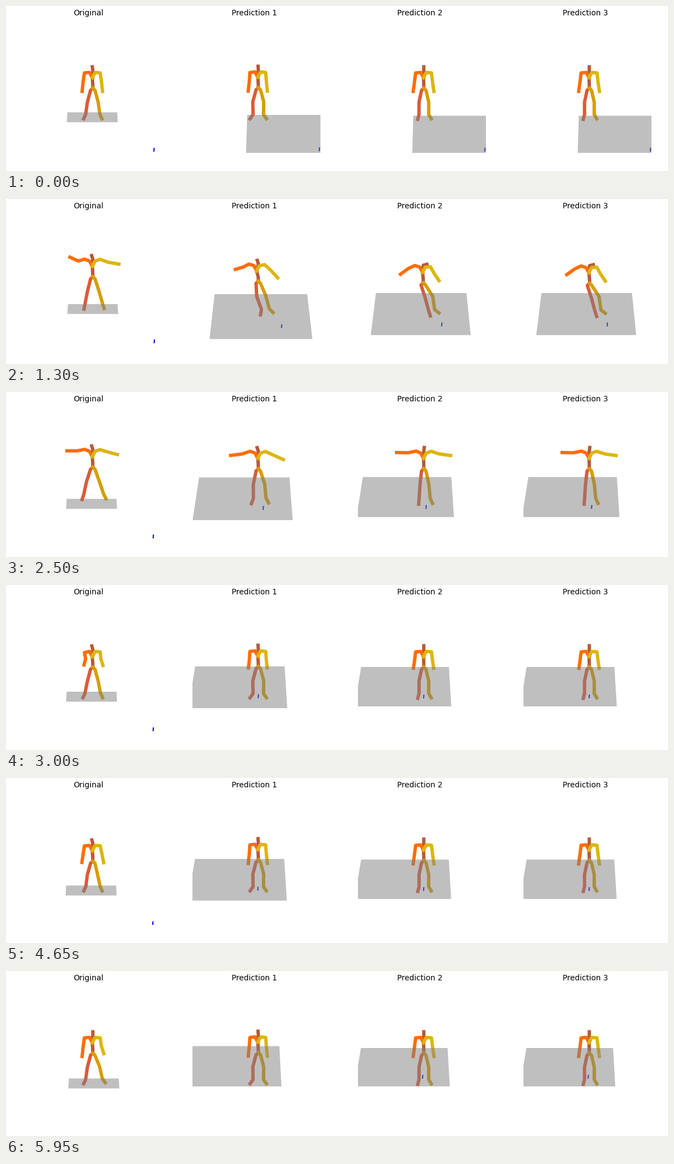
A matplotlib script that plays this animation: 1200 by 300 pixels, repeating every 6 s.

```python
import numpy as np
import matplotlib.pyplot as plt
from matplotlib.animation import FuncAnimation
from matplotlib.patches import Polygon, Rectangle

W, H, DPI = 1200, 300, 100
FRAMES, STEP = 120, 50
PANEL = W / 4
COLORS = {"spine": "#B75A39", "rleg": "#DD5A37", "lleg": "#D69E00",
          "rarm": "#FF6D00", "larm": "#DDB50E"}

# ---- figures: angles in degrees, 0 hangs straight down, positive is outward


def stance(x=157, y=149, lean=-4, nod=-8, arm=(8, 6, 1), left_arm=None,
           leg=(15, 8, 24), left_leg=None, size=1):
    """arm: upper, lower, reach; leg: thigh, shin, foot. Left copies right."""
    values = dict(x=x, y=y, lean=lean, nod=nod, size=size, arm=arm, leg=leg,
                  left_arm=left_arm or arm, left_leg=left_leg or leg)
    return {key: np.array(value, float) for key, value in values.items()}


def change(base, **new):
    return {**base, **{key: np.array(value, float) for key, value in new.items()}}


def mix(a, b, w):
    return {key: a[key] + (b[key] - a[key]) * w for key in a}


def chain(start, angles, lengths, side=1):
    a = np.radians(angles)
    bones = np.array(lengths) * (side * np.sin(a) + 1j * np.cos(a))
    return start + np.concatenate([[0], np.cumsum(bones)])


def arm_chain(chest, arm, side):
    upper, lower, reach = arm
    lift = upper / 90
    return chain(chest, [152, 82 + 36 * lift, upper, lower],
                 [10.8, 9.3, reach * (17 - 3 * lift), reach * (17 + 3 * lift)], side)


def leg_chain(pelvis, leg, size, side):
    return chain(pelvis, [45, *leg], [5.7, 22 * size, 22.5 * size, 9 * size], side)


def body(p):
    pelvis = p["x"] + 1j * p["y"]
    spine = chain(pelvis, [180, 180 - p["lean"], 180 + p["lean"], 180 - p["nod"]],
                  [7, 12, 13, 6.8])
    return {"spine": spine,
            "rleg": leg_chain(pelvis, p["leg"], p["size"], -1),
            "lleg": leg_chain(pelvis, p["left_leg"], p["size"], 1),
            "rarm": arm_chain(spine[2], p["arm"], -1),
            "larm": arm_chain(spine[2], p["left_arm"], 1)}


def jumper(still, star, land, dip=None, bend=None, end=None):
    """Poses of one figure; unnamed ones are derived from standing still."""
    return dict(still=still, star=star, land=land, end=end or still,
                peak=mix(still, star, 1.06),
                dip=dip or change(still, y=still["y"] + 2, size=still["size"] - 0.03),
                bend=bend or change(still, arm=still["arm"] * [1, 1, 0.88],
                                    left_arm=still["left_arm"] * [1, 1, 0.88]))


first = jumper(
    still=stance(),
    star=stance(y=134, nod=-16, arm=(86, 98, 1), left_arm=(78, 80, 1),
                leg=(18, 13, 17), left_leg=(21, 18, 27), size=1.09),
    land=stance(y=141, nod=-18, arm=(74, 115, 0.85), left_arm=(70, 80, 1.05),
                leg=(14, 11, 11), left_leg=(18, 16, 18), size=1.05),
    dip=stance(y=154, nod=-25, arm=(10, 12, 0.72), left_arm=(18, 20, 0.8),
               leg=(17, 6, 27), left_leg=(9, 20, 23), size=0.92),
    bend=stance(nod=-15, arm=(-10, 15, 0.68), left_arm=(5, 18, 0.74),
                leg=(15, 11, 25)),
    end=stance(nod=0, left_arm=(8, 17, 0.87), left_leg=(22, 13, 35)))
second = jumper(
    still=stance(y=148, nod=-4, arm=(4, 6, 1), leg=(15, -1, 35), size=1.03),
    star=stance(y=138, nod=-20, arm=(79, 91, 1.08), left_arm=(72, 72, 1.05),
                leg=(11, 0, 19), left_leg=(18, 6, 27), size=1.15),
    land=stance(lean=-14, nod=-18, arm=(63, 73, 0.78), left_arm=(48, 42, 1),
                leg=(-3, -20, 9), left_leg=(23, 15, 45), size=1.1))
third = jumper(
    still=stance(lean=-2, nod=0, arm=(7, 8, 1), leg=(12, 0, 15),
                 left_leg=(13, 0, 30)),
    star=stance(y=138, lean=-2, nod=8, arm=(86, 100, 1.05),
                left_arm=(79, 90, 1.07), leg=(6, 4, 3), left_leg=(12, 6, 24),
                size=1.15),
    land=stance(x=156, y=152, lean=-6, nod=75, arm=(65, 54, 0.9),
                left_arm=(29, 34, 0.87), leg=(-18, -15, -18),
                left_leg=(33, 8, 53), size=1.1))
fourth = {**third, "land": change(third["land"], x=157.5, y=152.8)}

BEATS = [(0, "still"), (700, "still"), (820, "dip"), (1110, "peak"),
         (1300, "land"), (1600, "dip"), (2250, "dip"), (2580, "peak"),
         (2680, "star"), (2880, "bend"), (3000, "bend"), (3350, "still"),
         (4600, "still"), (4720, "dip"), (4990, "peak"), (5100, "star"),
         (5290, "bend"), (5450, "dip"), (5750, "end"), (5950, "end")]


def pose_at(figure, t):
    for (t0, a), (t1, b) in zip(BEATS, BEATS[1:]):
        if t <= t1:
            u = (t - t0) / (t1 - t0)
            return mix(figure[a], figure[b], u * u * (3 - 2 * u))


# ---- floor: a ground rectangle seen in perspective, carrying a short blue trail

VANISH_X, HORIZON = 160, -563
DRIFT_TIMES = [0, 1300, 2000, 2900, 4600, 5100, 5950]


class Floor:
    def __init__(self, width, depth, trail, x, y):
        self.width, self.depth, self.trail = width, depth, trail
        self.x, self.y = x, y  # middle of the far edge at DRIFT_TIMES

    def project(self, t, across, deep):
        """Screen point of a ground point relative to the far edge's middle."""
        far = np.interp(t, DRIFT_TIMES, self.y) - HORIZON
        middle = (np.interp(t, DRIFT_TIMES, self.x) - VANISH_X) / far
        scale = far / (1 - far * deep * 1e-5)
        return VANISH_X + (middle + across) * scale, HORIZON + scale

    def corners(self, t):
        half = self.width / 2
        return [self.project(t, side * half, deep)
                for side, deep in [(-1, 0), (1, 0), (1, self.depth), (-1, self.depth)]]


near_floor = Floor(0.1193, 3.08, (0.136, 10.9),
                   [156.5, 157.3, 155.2, 155.2, 154, 156.9, 159.2],
                   [193.3, 191.1, 194.8, 193.9, 195.7, 193.3, 195.4])
floor_b = Floor(0.228, 13.57, (0.0472, 9.93),
                [224, 162, 141.9, 124, 124, 118, 115.8],
                [198, 173, 164.5, 148, 148, 139.3, 136.5])
floor_c = Floor(0.2235, 12.85, (0.048, 9.8),
                [223.5, 152.6, 131.7, 123.3, 123.2, 122.8, 121.9],
                [199.5, 171, 161.5, 149, 149, 142, 140])

SCENES = [("Original", first, near_floor), ("Prediction 1", second, floor_b),
          ("Prediction 2", third, floor_c), ("Prediction 3", fourth, floor_c)]

# ---- stage

fig = plt.figure(figsize=(W / DPI, H / DPI), dpi=DPI, facecolor="white")
ax = fig.add_axes([0, 0, 1, 1])
ax.set(xlim=(0, W), ylim=(H, 0))
ax.axis("off")

panels = []
for k, (title, figure, floor) in enumerate(SCENES):
    left = k * PANEL
    fig.text((left + PANEL / 2 - 0.3) / W, 0.98, title, ha="center", va="top",
             fontsize=10, family="DejaVu Sans")
    window = Rectangle((left + 37.5, 36), 232.5, 231, transform=ax.transData)
    trail, = ax.plot([], [], color="blue", lw=1.5, zorder=1)
    limbs = {name: ax.plot([], [], color=color, lw=4.4, zorder=2)[0]
             for name, color in COLORS.items()}
    sheet = ax.add_patch(Polygon(np.zeros((4, 2)), fc=(0.5, 0.5, 0.5, 0.5),
                                 lw=0, zorder=3))
    for artist in (trail, sheet, *limbs.values()):
        artist.set_clip_path(window)
    panels.append((left, figure, floor, trail, limbs, sheet))


def draw(i):
    t = i * STEP
    for left, figure, floor, trail, limbs, sheet in panels:
        joints = body(pose_at(figure, t))
        for name, line in limbs.items():
            line.set_data(joints[name].real + left + 0.3, joints[name].imag + 0.3)
        sheet.set_xy([(left + x, y) for x, y in floor.corners(t)])
        x, y = floor.project(t, *floor.trail)
        trail.set_data([left + x + 0.2, left + x - 0.2], [y - 2.2, y + 2.6])
    return []


anim = FuncAnimation(fig, draw, frames=FRAMES, interval=STEP, init_func=lambda: [],
                     repeat=True, repeat_delay=0, blit=False)
plt.show()
```
